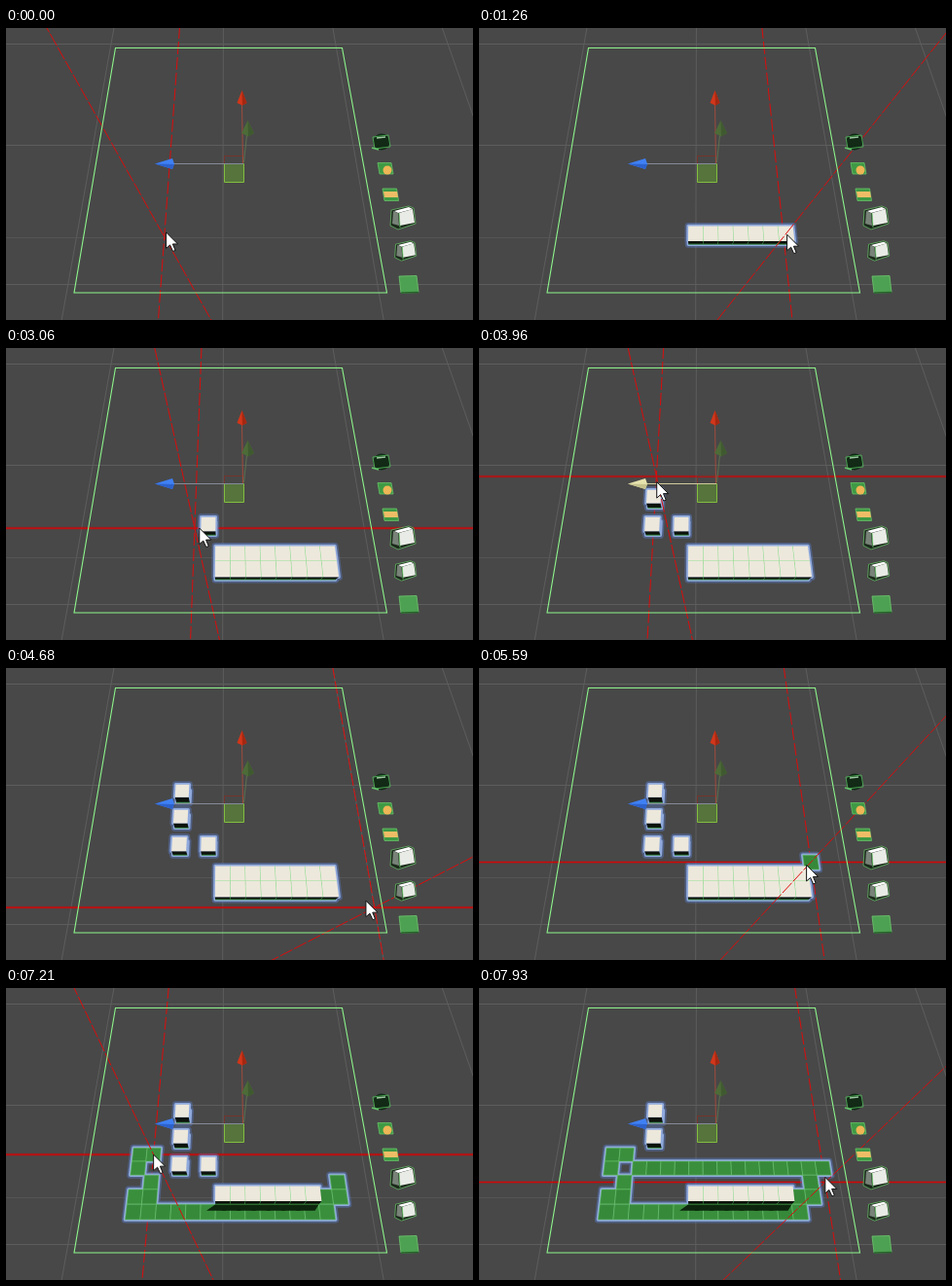
Write an HTML page with a canvas that moves like this. It is 480x300 px and loops after 8 s.

```html
<!DOCTYPE html>
<html>
<head>
<meta charset="utf-8">
<style>
html, body { margin: 0; width: 100%; height: 100%; overflow: hidden; background: #484848; }
canvas { display: block; width: 480px; height: 300px; }
</style>
</head>
<body>
<canvas id="stage" width="480" height="300"></canvas>
<script>
const g = document.getElementById('stage').getContext('2d');
const CX = 225, HORIZON = -637, NADIR = 325, LIFT = 1.03;

// Pointer path: time, column, row, and what it paints on the way there
const keys = [
  [0, 5.1, 1.3], [720, 9, 1], [899, 9, 1], [900, 9, 1, 'w'],
  [1260, 15.25, 1.15, 'w'], [1350, 16, 1, 'w'], [1530, 16, 0, 'w'], [1620, 16, 0, 'w'],
  [2160, 11.55, .1, 'w'], [2430, 9, 0, 'w'],
  [2880, 8, 3], [2970, 8, 3, 'w'], [3240, 6, 3], [3330, 6, 3, 'w'],
  [3600, 6, 5], [3690, 6, 5, 'w'], [3960, 6.05, 6.55], [4139, 6.05, 6.55], [4140, 6.05, 6.55, 'w'],
  [4230, 6.05, 6.55], [4770, 21, -2], [5140, 21, -2], [5500, 16.67, 1.8], [5590, 16.67, 1.8, 'g'],
  [5680, 17, 1, 'g'], [5770, 16, 1, 'g'], [5860, 16, 0, 'g'], [5950, 16, 0, 'g'],
  [6490, 5.65, .2, 'g'], [6670, 3, 0, 'g'], [6760, 3, 1, 'g'], [6850, 4, 1, 'g'],
  [6940, 4, 2, 'g'], [7030, 3, 3, 'g'], [7120, 3, 4, 'g'], [7210, 4, 4, 'g'],
  [7300, 5, 3, 'g'], [7840, 18, 3, 'g'], [7930, 18.05, 2.35], [8000, 18.05, 2.35]
];

// Ground point of the board in perspective; k > 1 raises it
function at(c, r, k = 1) {
  const d = 54.93 + r;
  const x = (c - 9.64) * 841 / d, y = 47623 / d + HORIZON;
  return [CX + x * k, NADIR + (y - NADIR) * k];
}

function trace(pts, close = true) {
  pts.forEach((p, i) => i ? g.lineTo(...p) : g.moveTo(...p));
  if (close) g.closePath();
}
function poly(pts, fill, stroke, width = 1) {
  g.beginPath();
  trace(pts);
  if (fill) { g.fillStyle = fill; g.fill(); }
  if (stroke) { g.strokeStyle = stroke; g.lineWidth = width; g.stroke(); }
}
function line(a, b, color, width = 1, dash = []) {
  g.beginPath();
  trace([a, b], false);
  g.setLineDash(dash);
  g.strokeStyle = color;
  g.lineWidth = width;
  g.stroke();
  g.setLineDash([]);
}
const quad = (c, r, k) => [at(c, r + .5, k), at(c + 1, r + .5, k), at(c + 1, r - .5, k), at(c, r - .5, k)];

function state(t) {
  const cells = new Map();
  let c = keys[0][1], r = keys[0][2];
  for (let i = 1; i < keys.length && keys[i - 1][0] <= t; i++) {
    const [t0, c0, r0] = keys[i - 1], [t1, c1, r1, kind] = keys[i];
    const u = Math.min(1, (t - t0) / (t1 - t0));
    if (kind) for (let s = 0; s <= 45 && s / 45 <= u; s++) {
      const cc = Math.round(c0 + (c1 - c0) * s / 45), rr = Math.round(r0 + (r1 - r0) * s / 45);
      cells.set(cc + ',' + rr, kind);
    }
    c = c0 + (c1 - c0) * u;
    r = r0 + (r1 - r0) * u;
  }
  return { cells, c, r };
}

function drawGrid() {
  g.fillStyle = '#484848';
  g.fillRect(0, 0, 480, 300);
  for (const c of [-.5, 9.5, 19.5, 29.5]) line(at(c, 22), at(c, -6), '#5d5d5d');
  for (const r of [-2, 8, 18]) {
    const y = Math.round(at(0, r)[1]) + .5;
    line([0, y], [480, y], '#5d5d5d');
  }
  line([0, 215.5], [480, 215.5], '#555');
}

function drawCells(cells) {
  const list = [...cells].map(([key, kind]) => {
    const [c, r] = key.split(',').map(Number);
    return { c, r, kind };
  }).sort((a, b) => b.r - a.r || a.c - b.c);

  // selection glow around everything placed
  g.beginPath();
  for (const { c, r, kind } of list) {
    trace(quad(c, r));
    if (kind === 'w') trace(quad(c, r, LIFT));
  }
  g.lineJoin = 'round';
  for (const [color, width] of [['rgba(90,125,205,.45)', 7], ['#8fa9dc', 3.5]]) {
    g.strokeStyle = color;
    g.lineWidth = width;
    g.stroke();
  }
  g.lineJoin = 'miter';

  for (const { c, r, kind } of list)
    if (kind === 'g') poly(quad(c, r), (c + r) % 2 ? '#37893a' : '#3a8f3d', 'rgba(115,205,115,.6)', .8);

  const blocks = list.filter(b => b.kind === 'w');
  for (const { c, r } of blocks)
    if (cells.get(c + ',' + (r - 1)) === 'g')
      poly([at(c, r - .5), at(c + 1, r - .5), at(c + .7, r - .92), at(c - .6, r - .92)], '#0d260d');

  for (const { c, r } of blocks) {
    const top = quad(c, r, LIFT), base = quad(c, r);
    poly([top[3], top[2], base[2], base[3]], '#0c120c');
    line(base[3], base[2], '#3c9a3c', .8);
    poly(top, '#ede8dc');
    const has = (dc, dr) => cells.get((c + dc) + ',' + (r + dr)) === 'w';
    if (has(1, 0)) line(top[1], top[2], '#7fe07f', .9);
    if (has(0, -1)) line(top[3], top[2], '#7fe07f', .9);
    if (!has(0, -1) && has(1, 0)) line(top[2], base[2], '#4ec04e', .8);
  }
}

function drawGizmo(hot) {
  poly([[224.5, 131.5], [243.5, 131.5], [243.5, 139.5], [224.5, 139.5]], null, '#74342c');
  poly([[224.5, 139.5], [244.5, 139.5], [244.5, 158.5], [224.5, 158.5]], '#56743c', '#82bd3f');
  line([243.5, 139], [242.5, 78], '#a04a3c');
  line([244.5, 138], [247.5, 110], '#5d7050');
  line([172, 139.5], [244, 139.5], hot ? '#cfcb9a' : '#858b98');
  poly([[242.5, 64], [247.5, 77], [243, 79.5], [237.5, 77]], '#d1361a');
  poly([[242.5, 64], [247.5, 77], [243, 79.5]], '#a32812');
  poly([[248.5, 95], [255, 108], [249, 111.5], [242, 108]], '#4d6b38');
  poly([[248.5, 95], [255, 108], [249, 111.5]], '#405a30');
  poly([[153, 139.5], [171, 134], [173, 139.5], [171, 145]], hot ? '#e6e2ae' : '#3f80f5');
  poly([[153, 139.5], [173, 140], [171, 145]], hot ? '#c6c28e' : '#2d62cc');
}

function drawCube(x, y, s) {
  const p = (dx, dy) => [x + dx * s, y + dy * s];
  poly([p(-10, -8), p(8, -12), p(13, -10), p(15, 6), p(-3, 12), p(-11, 8)], '#1c2a1c', '#68b868', .8);
  poly([p(-7, -7), p(8, -11), p(12, -9), p(-3, -5)], '#fff');
  poly([p(-2, -5), p(12, -9), p(14, 5), p(-1, 8)], '#e9ebe6');
  poly([p(-8, -7), p(-3, -5), p(-2, 8), p(-9, 6)], '#788278');
  line(p(-2, -5), p(-1, 10), '#6ecf6e', .8);
}

function drawTray() {
  const tile = (x, y, w, h) =>
    poly([[x, y], [x + w, y], [x + w + 2, y + h], [x + 2, y + h]], '#3f9a44', '#69c069', .8);
  g.fillStyle = '#122a16';
  g.beginPath();
  g.arc(386, 117, 8.5, 0, 7);
  g.fill();
  poly([[377, 112], [393, 110], [395, 122], [379, 124]], null, '#4fae57', .9);
  line([381, 113], [390, 112], '#9cc7a0', 1.5);
  line([376, 123], [383, 125], '#62c46a', 1.5);
  tile(382, 138.5, 14, 11.5);
  g.fillStyle = '#eeb656';
  g.beginPath();
  g.ellipse(392, 146, 4.5, 4.5, 0, 0, 7);
  g.fill();
  tile(387, 165, 14.5, 12.5);
  poly([[388, 168], [402, 168], [403, 174], [389, 174]], '#efbd66');
  drawCube(406, 195, 1);
  drawCube(409, 229, .85);
  poly([[404, 255], [422, 254.5], [424, 271.5], [406, 272]], '#4da152', '#6fc76f', .8);
  line([406, 272], [424, 271.5], '#27632a', 1.5);
}

function drawPointer(x, y) {
  const shape = [[0, 0], [0, 16.5], [4, 13], [7, 19.5], [9.5, 18.5], [6.8, 12], [12, 12]];
  poly(shape.map(([a, b]) => [x + a, y + b]), '#fff', '#111', 1);
}

function draw(t) {
  const { cells, c, r } = state(t);
  const [px, py] = at(c + .5, r);
  const col = Math.round(c) + .5, row = Math.round(r);
  const [sx, sy] = at(col, row);

  drawGrid();
  if (row !== 1 && row !== -2) {
    line([0, sy], [480, sy], 'rgba(200,0,0,.4)', 2.6);
    line([0, sy], [480, sy], '#d00808', 1.2);
  }
  line(at(col, 22), at(col, -6), '#dc0c0c', 1, [13, 3]);
  drawCells(cells);
  line([CX, NADIR], [CX + (sx - CX) * 5, NADIR + (sy - NADIR) * 5], '#dc0c0c', 1, [14, 2]);
  poly([[112.5, 20.5], [345.5, 20.5], [391.5, 272], [70, 272]], null, '#8df58b', 1.1);
  drawGizmo(Math.abs(py - 139) < 5 && px > 150 && px < 240);
  drawTray();
  drawPointer(px, py);
}

const start = performance.now();
function tick() {
  const t = (performance.now() - start) % 8000;
  const from = t < 5230 ? 0 : 5230;
  draw(from + Math.floor((t - from) / 90) * 90);
  requestAnimationFrame(tick);
}
tick();
</script>
</body>
</html>
```
